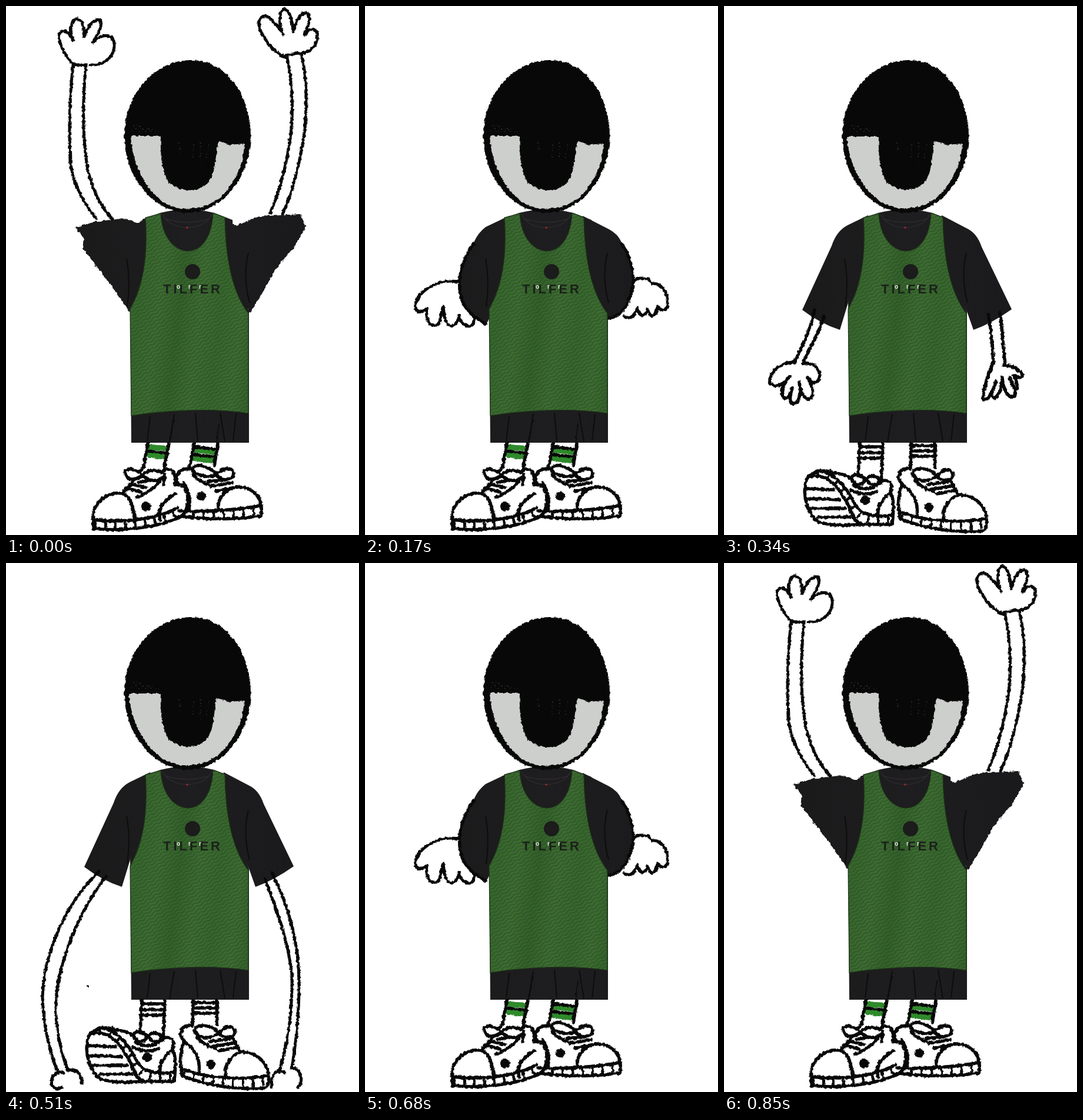
Animation of 600x900 px, one loop 1020 ms. Source, as an HTML page:

```html
<!DOCTYPE html>
<html lang="en">
<head>
<meta charset="utf-8">
<title>Cheering figure</title>
<style>
html, body { margin: 0; width: 100%; height: 100%; overflow: hidden; background: #fff; }
svg { display: block; width: 100vw; height: 100vh; }
.ink { fill: none; stroke: #080808; stroke-width: 5; stroke-linecap: round; stroke-linejoin: round; filter: url(#rough); }
.bold { stroke-width: 5.6; }
.ticks { stroke-width: 13; stroke-dasharray: 4 13; stroke-linecap: butt; }
.band { stroke: #2f8a2b; stroke-width: 9; stroke-linecap: butt; }
.dot { fill: #080808; stroke: none; }
.cloth { fill: url(#black); }
.fold { fill: none; stroke: #0d0d0e; stroke-width: 2; }
.rim { fill: none; stroke: #2c2a2d; stroke-width: 1.5; }
.smudge { fill: none; stroke: #333; stroke-width: 1.3; stroke-dasharray: 2 5 1 3; filter: url(#rough); }
text { font-family: "Liberation Sans", Arial, sans-serif; font-weight: 700; }
</style>
</head>
<body>
<svg viewBox="0 0 600 900">
  <defs>
    <filter id="rough" filterUnits="userSpaceOnUse" x="0" y="0" width="600" height="900" color-interpolation-filters="sRGB">
      <feTurbulence type="fractalNoise" baseFrequency=".2" numOctaves="2" seed="4"/>
      <feDisplacementMap in="SourceGraphic" scale="5" xChannelSelector="R" yChannelSelector="G"/>
    </filter>
    <linearGradient id="black" gradientUnits="userSpaceOnUse" x1="133" x2="489" y1="0" y2="0">
      <stop offset="0" stop-color="#1b1a1b"/><stop offset=".5" stop-color="#1e1d1f"/><stop offset="1" stop-color="#1a191b"/>
    </linearGradient>
    <linearGradient id="green" gradientUnits="userSpaceOnUse" x1="211" x2="281" y1="0" y2="8" spreadMethod="reflect">
      <stop offset="0" stop-color="#33602a"/><stop offset=".5" stop-color="#3d6b32"/><stop offset="1" stop-color="#37662d"/>
    </linearGradient>
    <pattern id="weave" width="16" height="6" patternUnits="userSpaceOnUse" patternTransform="rotate(-32)">
      <path d="M0 2Q4 5 8 2T16 2" fill="none" stroke="#23451d" stroke-width="1.6" opacity=".55"/>
    </pattern>
    <path id="vest" d="M237 360L263 353C265 392 285 416 309 417C335 416 350 390 352 352L372 360C373 430 385 488 412 523V693C350 683 270 688 213 697L211 515C231 482 242 430 237 360Z"/>
  </defs>

  <!-- hands tucked behind the sleeves -->
  <g class="ink" data-on="14">
    <path d="M162 470C130 462 95 480 86 506C84 522 94 523 105 515C103 530 108 546 122 543C132 538 127 524 133 511C134 530 138 545 148 544C157 541 159 533 160 526C162 540 172 547 181 544C187 539 186 530 185 523"/>
    <path d="M457 468C468 460 484 462 487 472C506 471 516 490 514 509C512 520 503 519 497 511C496 529 485 534 480 515C478 529 466 531 463 514C457 532 446 533 440 527"/>
  </g>

  <!-- sleeves -->
  <g class="cloth" data-on="05" filter="url(#rough)">
    <path d="M240 360L222 369Q205 360 185 363L150 367L118 377L133 396L131 412L152 441L178 474L211 522L250 420Z"/>
    <path d="M372 362L390 374L430 358L500 354L510 375L490 410L457 449L438 485L414 523L360 420Z"/>
  </g>
  <g data-on="14">
    <path class="cloth" d="M245 357L205 376Q192 386 185 402C164 432 157 465 162 490C166 514 182 528 205 544L212 530L250 420ZM370 357L415 380Q430 388 436 402C456 432 460 470 451 493C445 514 431 530 413 534L360 420Z"/>
    <path class="ink" d="M185 404C164 432 157 465 162 490C166 514 182 528 205 541M436 404C456 432 460 470 451 493C445 514 431 530 415 531"/>
  </g>
  <path class="cloth" data-on="23" d="M245 356L210 373Q191 383 183 408L133 517Q163 540 197 551L211 505L250 400ZM370 356L412 378Q430 386 438 410L489 516Q455 540 424 551L413 520L360 400Z"/>

  <!-- shirt -->
  <path class="cloth" d="M262 352Q308 340 354 352L385 364L390 460L413 520V743H213L211 505L235 420L232 363Z"/>
  <path class="fold" d="M205 430Q212 470 206 512M412 420Q402 460 414 505M245 698L240 740M286 694L278 742M322 692L326 740M364 692L372 741M391 694L386 740"/>
  <path class="rim" d="M266 354Q276 376 308 377Q340 376 350 354M270 362Q308 374 346 362"/>
  <circle cx="308" cy="377" r="1.7" fill="#a3262c"/>
  <use href="#vest" fill="url(#green)"/>
  <use href="#vest" fill="url(#weave)" stroke="#1d3319" stroke-width="1.2"/>
  <circle cx="317" cy="452" r="13" fill="#1b1c1b"/>
  <text x="267" y="489" font-size="22" letter-spacing="4" fill="#1b211a">TILFER</text>
  <text x="290" y="481" font-size="10" letter-spacing="14" fill="#e8ece6">orr</text>

  <!-- head -->
  <path d="M313 94C372 93 414 150 414 222C414 288 368 349 310 350C250 349 204 290 203 222C203 150 254 95 313 94Z" fill="#080808" stroke="#080808" stroke-width="4" filter="url(#rough)"/>
  <path data-on="0145" filter="url(#rough)" fill="#cdcfcc" d="M212 221L263 221C262 248 264 280 275 297C290 319 335 320 349 293C357 274 356 252 361 231L382 236L405 234C405 266 388 305 364 326C343 343 310 348 287 343C244 328 214 272 212 221Z"/>
  <path data-on="23" filter="url(#rough)" fill="#cdcfcc" d="M209 222L263 222C262 248 264 280 275 297C290 318 332 319 346 292C354 273 354 252 357 231L382 236L405 234C404 264 387 304 363 325C342 342 310 348 287 342C242 328 211 272 209 222Z"/>
  <path class="smudge" d="M214 212L262 214M216 203L234 205M220 209L250 210M294 232L296 252M319 235L317 260M330 232L331 268M345 235L340 262"/>

  <!-- arms raised -->
  <g class="ink" data-on="05">
    <path d="M136 100L116 100C105 92 92 70 90 52C91 37 106 40 114 58C106 38 113 20 122 22C132 25 132 40 133 52C138 35 150 20 160 24C166 32 155 50 148 62C160 48 182 45 184 64C185 82 172 102 143 100"/>
    <path d="M114 101C107 160 107 210 109 262C113 305 133 335 153 362M136 101C130 160 130 220 138 273C146 315 162 342 180 362"/>
    <path d="M476 88C455 80 432 50 430 32C428 18 441 12 450 22C460 32 466 40 471 48C462 30 465 8 472 5C483 8 487 25 488 45C492 25 502 9 512 12C520 18 512 38 507 50C512 40 523 35 529 46C532 66 515 83 497 80L476 84"/>
    <path d="M478 88C487 130 489 180 483 225C476 275 463 320 449 352M502 82C512 120 511 170 508 210C500 265 488 315 470 354"/>
  </g>

  <!-- arms lowered -->
  <g class="ink bold" data-on="2">
    <path d="M154 517C146 555 130 585 120 605M170 528C160 560 144 585 134 608M120 607C100 604 76 622 78 640C84 652 102 645 112 630C98 645 95 662 103 667C109 668 114 658 116 650C110 668 112 679 120 676C130 672 130 655 128 640C130 660 138 672 148 667C155 655 146 640 142 632C150 646 162 641 163 628C160 612 148 606 134 608"/>
    <path d="M449 525C456 555 456 585 458 608M469 521C474 555 474 585 478 608M458 606C450 625 438 655 441 670C450 671 457 655 463 638C456 653 452 666 460 667C470 660 472 645 473 632C474 650 482 668 493 665C498 655 490 640 485 632C490 644 496 656 499 649C498 640 495 633 492 628C500 634 508 633 507 627C498 615 490 612 476 611"/>
  </g>

  <!-- arms stretched to the floor -->
  <g class="ink" data-on="3">
    <path d="M158 525C100 580 64 665 62 740C64 795 75 835 89 868M170 533C120 600 88 680 84 755C86 800 95 840 106 864M98 868C85 862 75 875 78 888C82 895 89 896 95 892M106 864C116 858 129 868 129 885"/>
    <path d="M440 537C460 590 479 640 486 700C487 775 477 825 464 866M452 527C484 590 500 660 498 730C497 785 491 825 486 859M474 867C460 857 450 872 451 892M484 860C500 857 508 880 496 892"/>
    <circle class="dot" cx="139" cy="720" r="2"/>
  </g>

  <!-- striped socks and shoes, toes out -->
  <g class="ink bold" data-on="0145">
    <path class="band" d="M241 750L278 753M239 763L273 768M317 755L356 759M315 769L354 774"/>
    <path d="M241 744L234 783M277 744L268 790M320 744L312 784M360 744L354 782M240 757L275 761M318 750L357 754M317 763L355 767"/>
    <path class="fold" d="M285 704L279 738M362 712L358 740"/>
    <path d="M148 874C145 847 172 825 197 829C212 832 217 855 219 876M148 874C190 879 250 876 291 854M148 874L149 889C200 895 260 886 295 870M234 784L227 793M232 798C215 783 199 786 203 797C208 809 222 806 232 798C245 785 262 790 270 797C265 810 244 811 232 798M198 828Q211 819 216 806M264 804Q251 825 222 836M210 813L238 819M204 820L230 827M226 810L243 808M268 790C285 782 290 800 287 816C303 810 312 825 308 850C305 864 300 870 291 870M262 874Q255 848 288 830M270 797L268 815"/>
    <path class="ticks" d="M150 882C200 889 260 880 292 862"/>
    <path d="M293 814C284 796 298 785 315 788M358 798C365 785 385 783 387 795C385 808 368 808 358 798C345 782 325 778 318 785C315 800 345 802 358 798M343 809L376 806M350 817L384 811M357 825L390 819M318 798Q330 810 350 817M295 859C340 862 400 856 434 850M297 868C350 875 400 873 434 867V850C430 828 410 814 385 820C365 828 358 845 362 858M302 812Q317 835 310 860"/>
    <path class="ticks" d="M300 864C350 868 400 865 434 859"/>
    <circle class="dot" cx="238" cy="851" r="8"/><circle class="dot" cx="332" cy="834" r="8"/>
  </g>

  <!-- plain socks and shoes, one sole turned up -->
  <g class="ink bold" data-on="23">
    <path d="M231 744L228 795M270 744L267 812M318 744L317 784M358 744L359 785M231 750H270M230 760H270M229 769H269M318 748H359M318 757H359M318 766H359"/>
    <path d="M140 806C148 790 170 788 190 795Q208 796 218 806M140 806C132 832 143 866 161 878C185 885 210 884 230 882H285M148 800C184 795 199 829 211 848C218 865 221 878 233 881M172 793C200 803 212 830 223 848C233 866 255 871 287 866"/>
    <path d="M141 821L186 823M141 838L196 840M147 855L206 855M160 870L214 869"/>
    <path class="ticks" d="M158 796C192 800 205 832 217 850C227 874 250 876 287 873"/>
    <path d="M241 806C228 792 212 797 218 808C226 817 236 814 241 806C250 795 262 800 264 808C258 820 248 814 241 806M220 816Q245 828 264 812M216 824Q240 835 260 826M264 812C275 800 290 812 283 826C290 842 288 860 286 880M284 827Q259 845 262 868"/>
    <path d="M317 787C295 785 292 805 303 813C296 835 295 850 298 860C335 876 400 881 446 872M298 860V872C340 890 400 897 440 893Q448 888 446 872C445 850 425 830 398 832C378 840 370 860 374 876M362 800C372 785 389 787 389 799C383 812 370 808 362 800C345 782 318 784 321 798C330 812 350 808 362 800M324 806Q335 820 357 826M346 814L379 810M354 822L386 817M361 830L394 824M302 814C325 828 330 846 328 868M384 806L398 832"/>
    <path class="ticks" d="M301 867C340 882 400 890 444 882"/>
    <circle class="dot" cx="240" cy="841" r="8"/><circle class="dot" cx="348" cy="853" r="8"/>
  </g>
</svg>
<script>
const STEP = 170, COUNT = 6;
const parts = [...document.querySelectorAll('[data-on]')];
const start = performance.now();
let shown = -1;

function draw(now) {
  const pose = Math.floor(Math.max(0, now - start) / STEP) % COUNT;
  if (pose !== shown) {
    shown = pose;
    for (const part of parts) part.style.display = part.dataset.on.includes(pose) ? '' : 'none';
  }
  requestAnimationFrame(draw);
}
draw(start);
</script>
</body>
</html>
```
